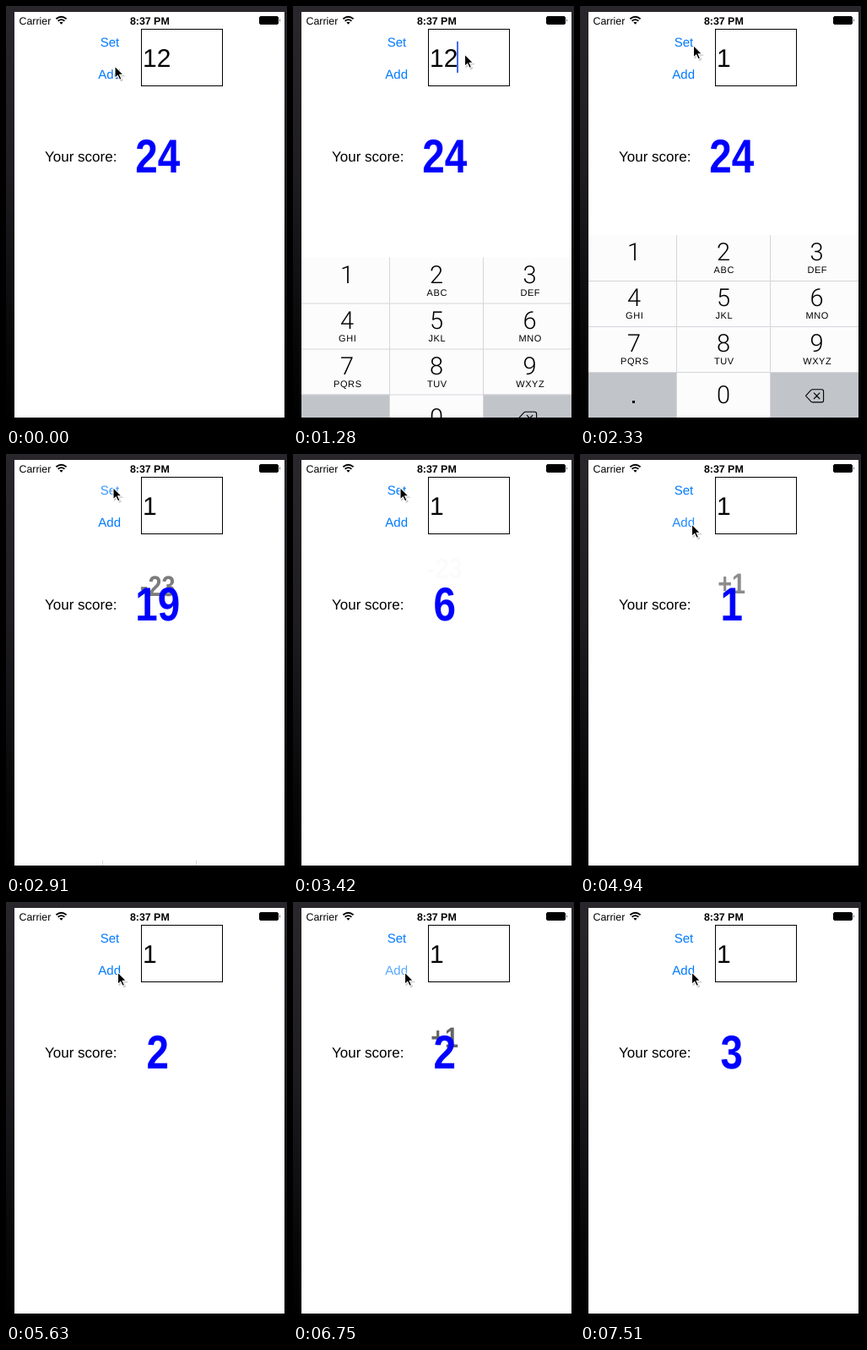
An HTML page that plays this animation: 333x497 px, repeating every 8000 ms.

```html
<!DOCTYPE html>
<html lang="en">
<head>
<meta charset="utf-8">
<title>Score counter</title>
<style>
html, body { margin: 0; width: 100%; height: 100%; overflow: hidden; background: #000; }
svg { display: block; width: 333px; height: 497px; font-family: "Liberation Sans", Arial, sans-serif; text-rendering: geometricPrecision; }
.mid { text-anchor: middle; }
.link { fill: #007aff; font-size: 15px; }
.heavy { font-weight: 700; }
.digit { font: 300 29px Roboto, "Liberation Sans", sans-serif; }
.letters { font-size: 11px; letter-spacing: .6px; }
</style>
</head>
<body>
<svg viewBox="0 0 333 497">
  <defs>
    <linearGradient id="desk" x1="0" y1="0" x2="0" y2="1">
      <stop offset="0" stop-color="#29262c"/>
      <stop offset=".4" stop-color="#1e1c21"/>
      <stop offset=".8" stop-color="#070708"/>
      <stop offset="1" stop-color="#000"/>
    </linearGradient>
    <clipPath id="screen"><rect x="10" y="7" width="320" height="480"/></clipPath>
  </defs>
  <rect width="333" height="497" fill="url(#desk)"/>
  <g clip-path="url(#screen)">
    <rect x="10" y="7" width="320" height="480" fill="#fff"/>

    <text x="15.5" y="21.5" font-size="12.4">Carrier</text>
    <g fill="none" stroke="#000" stroke-width="1.8">
      <path d="M59.4 15.3Q65.5 10.2 71.6 15.3M61.6 17.8Q65.5 14.4 69.4 17.8"/>
      <path d="M65.5 21.8L63.4 19.6Q65.5 17.8 67.6 19.6Z" fill="#000" stroke="none"/>
    </g>
    <text class="mid heavy" x="170.3" y="21.5" font-size="12.4">8:37 PM</text>
    <rect x="300.5" y="12.5" width="22" height="9" rx="1.5" fill="#000" stroke="#000"/>
    <path d="M324 15.3Q325.6 17 324 18.8Z"/>

    <text class="mid link" id="set" x="123" y="48">Set</text>
    <text class="mid link" id="add" x="122.7" y="86">Add</text>
    <rect x="160.5" y="27.5" width="96" height="67" fill="#fff" stroke="#000"/>
    <text id="field" x="162" y="72" font-size="30"></text>
    <rect id="caret" y="42" width="2" height="37" fill="#426bf2"/>

    <text x="46" y="184" font-size="17">Your score:</text>
    <g id="deltaBox"><text class="mid heavy" id="delta" font-size="34" transform="scale(.85 1)"></text></g>
    <g transform="translate(179.7 197)"><text class="mid heavy" id="score" font-size="56" fill="#00f" transform="scale(.85 1)"></text></g>

    <g id="keys">
      <rect x="10" width="320" height="216" fill="#fcfcfd"/>
      <rect x="10" y="162" width="105" height="54" fill="#c1c5c9"/>
      <rect id="erase" x="225" y="162" width="105" height="54"/>
      <path d="M114.5 0V216M225.5 0V216M10 54.5H330M10 108.5H330M10 162.5H330" stroke="#d5d6d9"/>
      <g id="labels"></g>
      <path d="M267.5 190.3L273.8 183.4Q274.6 182.7 275.6 182.7H286.4Q288.6 182.7 288.6 184.9V195.7Q288.6 197.9 286.4 197.9H275.6Q274.6 197.9 273.8 197.2ZM277 186.6L284.2 194M284.2 186.6L277 194" fill="none" stroke="#000" stroke-width="1.1"/>
    </g>
  </g>
  <g id="pointer">
    <path d="M1 1.5V16.5L4.6 13.2L7 18.4L9.8 17L7.6 12.2H12.3Z" fill="#000" opacity=".22"/>
    <path d="M0 0V14.4L3.3 11.3L5.7 16.4L8 15.3L5.7 10.4H10.2Z" fill="#000" stroke="#fff" stroke-width="1.1"/>
  </g>
</svg>
<script>
const $ = id => document.getElementById(id);
const LOOP = 8000;
const clamp = v => Math.min(1, Math.max(0, v));
const smooth = v => v * v * (3 - 2 * v);

// Pointer stops: time, x, y
const path = [
  [60, 129, 71], [280, 130.5, 43], [455, 130.5, 43], [570, 178, 48], [800, 178, 48],
  [930, 203.5, 57], [1290, 203.5, 57], [1480, 278, 461], [2040, 278, 461],
  [2290, 134.5, 46.5], [2340, 134.5, 46.5], [2430, 128, 30], [2560, 127, 39.5],
  [3700, 127, 39.5], [4060, 191, 53], [4190, 191, 53], [4240, 181.5, 64], [4410, 132.5, 83]
];

// Each tap on a button: press time, release time, score before and after
const taps = [
  { btn: 'set', down: 2650, up: 2730, from: 24, to: 1 },
  { btn: 'add', down: 4650, up: 4730, from: 1, to: 2 },
  { btn: 'add', down: 6520, up: 6610, from: 2, to: 3 }
];
const RUN = 900, ERASE = 1510, FOCUS = 1110, SHOW = 1160, HIDE = 2730;

const label = (cls, x, y, s) => `<text class="mid ${cls}" x="${x}" y="${y}">${s}</text>`;
const colX = [64, 170, 280.5];
$('labels').innerHTML = ['', 'ABC', 'DEF', 'GHI', 'JKL', 'MNO', 'PQRS', 'TUV', 'WXYZ'].map((s, i) => {
  const x = colX[i % 3], y = 54 * Math.floor(i / 3);
  return label('digit', x, y + 30, i + 1) + label('letters', x + .8, y + 45, s);
}).join('') + label('digit', 170, 199, 0) + '<rect x="62" y="196" width="3" height="3"/>';

function pointerAt(t) {
  const i = path.findIndex(p => p[0] > t);
  if (i === 0) return path[0].slice(1);
  if (i < 0) return path[path.length - 1].slice(1);
  const [t0, x0, y0] = path[i - 1], [t1, x1, y1] = path[i];
  const k = smooth((t - t0) / (t1 - t0));
  return [x0 + (x1 - x0) * k, y0 + (y1 - y0) * k];
}

// Critically damped slide, 0 to 1
function settle(ms) {
  const a = Math.max(0, ms) * .03;
  return 1 - (1 + a) * Math.exp(-a);
}

function buttonAlpha(id, t) {
  const tap = taps.filter(p => p.btn === id && t >= p.down).pop();
  if (!tap) return 1;
  return .2 + .8 * clamp((t - tap.up) / 250);
}

function draw(t) {
  const [x, y] = pointerAt(t);
  $('pointer').setAttribute('transform', `translate(${x} ${y})`);

  const short = t >= ERASE;
  $('field').textContent = short ? '1' : '12';
  $('caret').setAttribute('x', short ? 178 : 194);
  $('caret').setAttribute('opacity', t < FOCUS ? 0 : 1 - clamp((t - 2030) / 150));
  $('erase').setAttribute('fill', short && t < 1570 ? '#fcfcfd' : '#c1c5c9');

  const shown = settle(t - SHOW) - settle(t - HIDE);
  $('keys').setAttribute('transform', `translate(0 ${487 - 216 * shown})`);

  for (const id of ['set', 'add']) $(id).setAttribute('opacity', buttonAlpha(id, t));

  const tap = taps.filter(p => t >= p.up).pop();
  const k = tap ? clamp((t - tap.up) / RUN) : 0;
  const { from, to } = tap || taps[0];
  const rise = 1 - (1 - k) ** 3;
  const diff = to - from;
  $('score').textContent = Math.round(from + diff * k);
  $('delta').textContent = diff > 0 ? '+' + diff : diff;
  $('deltaBox').setAttribute('opacity', tap ? 1 - rise : 0);
  $('deltaBox').setAttribute('transform', `translate(179.7 ${189 - 43 * rise})`);
}

const start = performance.now();
function tick() {
  draw((performance.now() - start) % LOOP);
  requestAnimationFrame(tick);
}
tick();
</script>
</body>
</html>
```
